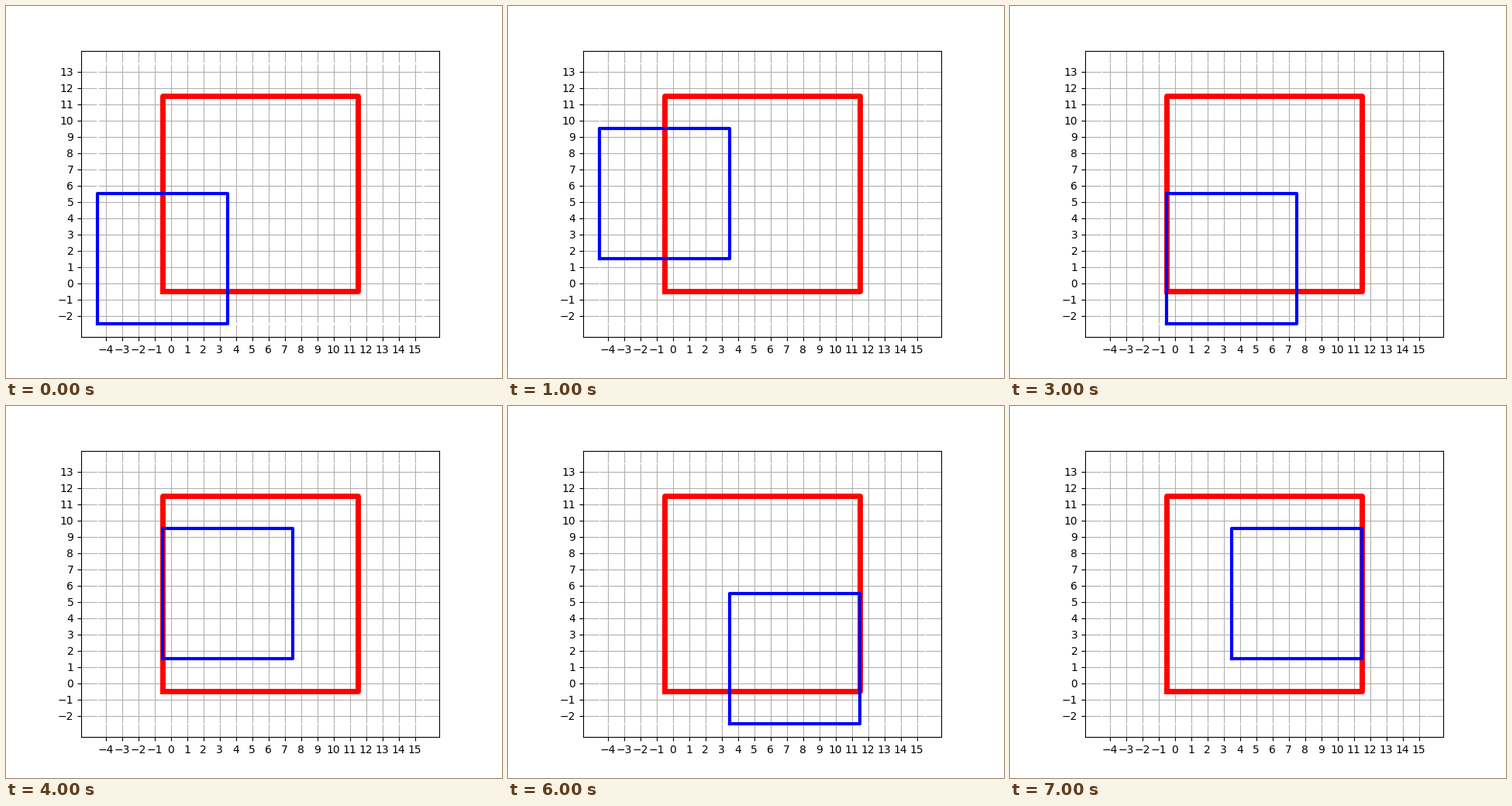
A matplotlib script that plays this animation: 640x480 px, repeating every 8000 ms.

```python
import matplotlib.pyplot as plt
import numpy as np
from matplotlib.animation import FuncAnimation

SIZE = 8      # side of the sliding window
STRIDE = 4
ROWS = 3      # window positions per column
STEPS = 8


def outline(x, y, w, h):
    """Corner coordinates of a rectangle, starting at the lower left."""
    return [x, x + w, x + w, x, x], [y, y, y + h, y + h, y]


fig, ax = plt.subplots(figsize=(6.4, 4.8), dpi=100)
ax.set_aspect("equal")
ax.set_xlim(-5.5, 16.5)
ax.set_ylim(-3.3, 14.3)
ax.set_xticks(np.arange(-4, 16))
ax.set_yticks(np.arange(-2, 14))
ax.grid(True)

padding, = ax.plot(*outline(-4.5, -2.5, 20, 16), color="white", lw=1)
ax.plot(*outline(-0.5, -0.5, 12, 12), color="red", lw=5)
window, = ax.plot([], [], color="blue", lw=3)


def update(step):
    col, row = divmod(step, ROWS)
    window.set_data(*outline(-4.5 + col * STRIDE, -2.5 + row * STRIDE, SIZE, SIZE))
    # the padding border is heavier at the start
    padding.set_linewidth(2 if step == 0 else 1)
    return padding, window


anim = FuncAnimation(fig, update, frames=STEPS, interval=1000, repeat=True)
plt.show()
```
